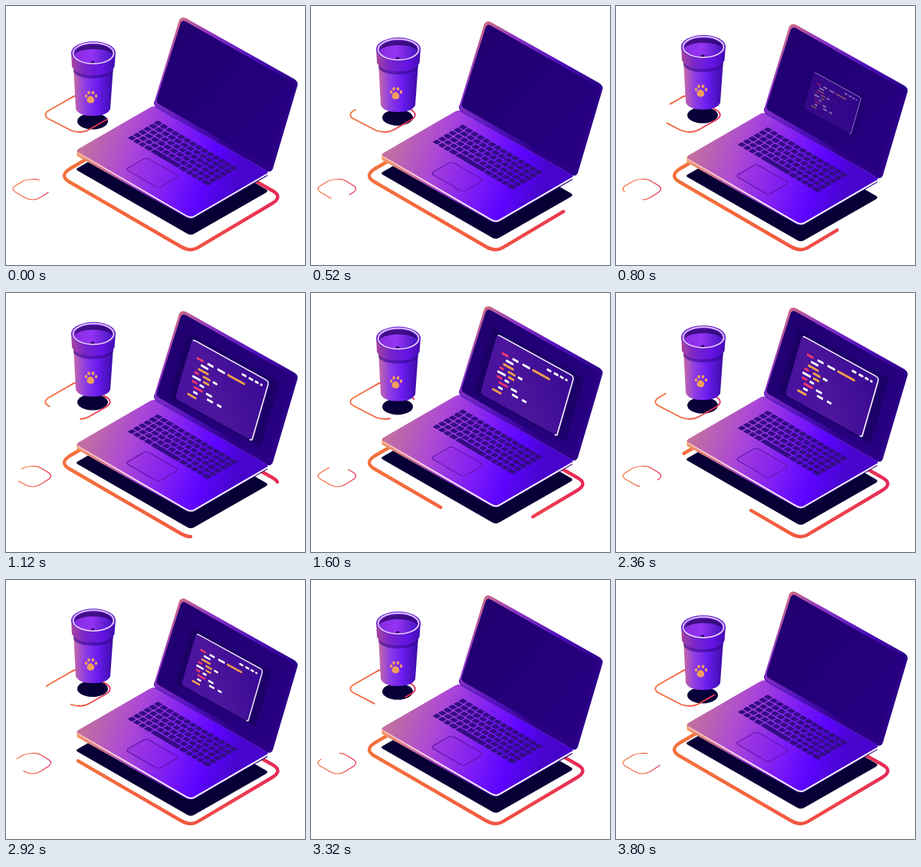
These frames come from a looping animation (390x337 px, 3840 ms). An HTML page:

```html
<!DOCTYPE html>
<html lang="en">
<head>
<meta charset="utf-8">
<title>Laptop and cup</title>
<style>
  html, body { margin: 0; width: 100%; height: 100%; overflow: hidden; background: #fff; }
  svg { display: block; }
  .loop { fill: none; stroke-linecap: round; }
</style>
</head>
<body>
<svg width="390" height="337" viewBox="0 0 390 337">
  <defs>
    <linearGradient id="trail">
      <stop offset=".1" stop-color="#f3703c"/><stop offset=".55" stop-color="#f2593f"/><stop offset="1" stop-color="#e62a58"/>
    </linearGradient>
    <linearGradient id="deck" gradientUnits="userSpaceOnUse" x1="105" y1="165" x2="300" y2="235">
      <stop offset="0" stop-color="#c2719f"/><stop offset=".3" stop-color="#ac48d6"/>
      <stop offset=".6" stop-color="#7c1cf6"/><stop offset=".8" stop-color="#5c04ff"/><stop offset="1" stop-color="#4804cc"/>
    </linearGradient>
    <linearGradient id="side">
      <stop offset="0" stop-color="#f59a5e"/><stop offset=".3" stop-color="#a23bd0"/><stop offset=".6" stop-color="#2a0080"/>
    </linearGradient>
    <linearGradient id="rimlight">
      <stop offset="0" stop-color="#f6b7b0"/><stop offset=".4" stop-color="#f8e6ff"/><stop offset="1" stop-color="#fff"/>
    </linearGradient>
    <linearGradient id="lid" gradientUnits="userSpaceOnUse" x1="215" y1="20" x2="350" y2="150">
      <stop offset="0" stop-color="#d5707e"/><stop offset=".25" stop-color="#8f35c4"/>
      <stop offset=".6" stop-color="#5010bc"/><stop offset=".9" stop-color="#2c0088"/>
    </linearGradient>
    <linearGradient id="screen" x1="0" y1="0" x2="1" y2="1">
      <stop offset="0" stop-color="#20006e"/><stop offset="1" stop-color="#280084"/>
    </linearGradient>
    <linearGradient id="pane" x1="0" y1=".8" x2="1" y2=".2">
      <stop offset="0" stop-color="#4a12a0"/><stop offset=".4" stop-color="#4c159c"/><stop offset="1" stop-color="#3a0a94"/>
    </linearGradient>
    <linearGradient id="body">
      <stop offset="0" stop-color="#c66ca4"/><stop offset=".28" stop-color="#8f3ce4"/>
      <stop offset=".6" stop-color="#6a1cf0"/><stop offset="1" stop-color="#3c0ca6"/>
    </linearGradient>
    <linearGradient id="band">
      <stop offset="0" stop-color="#a8489c"/><stop offset=".3" stop-color="#7a25cc"/>
      <stop offset=".7" stop-color="#6414e4"/><stop offset="1" stop-color="#420cae"/>
    </linearGradient>
    <linearGradient id="well">
      <stop offset="0" stop-color="#8a2ce0"/><stop offset=".45" stop-color="#9434f4"/><stop offset="1" stop-color="#4814c4"/>
    </linearGradient>
  </defs>

  <path class="loop" id="bigLoop" pathLength="100" stroke="url(#trail)" stroke-width="4.4" stroke-dasharray="79 21"
    d="M241 317Q235 317 228 313L83 229Q69 221 83 212L176 158Q189 150 202 158L347 240Q362 248 347 257L254 312Q247 317 241 317"/>
  <path class="loop" id="smallLoop" pathLength="100" stroke="url(#trail)" stroke-width="1.2" stroke-dasharray="78 22"
    d="M34 225.500Q42 225 46 228L56 234Q61 238 56 242L45 249Q40 252 35 252Q29 252 24 249L12 242Q6 238 12 234L22 228Q27 225.500 34 225.500"/>

  <ellipse id="cupShadow" cx="113" cy="150" rx="20" ry="10.5" fill="#080038"/>
  <path class="loop" id="cupLoop" pathLength="100" stroke="url(#trail)" stroke-width="1.8" stroke-dasharray="78 22"
    d="M97 164Q103 164 108 161L131 148Q140 142 132 136L103 119Q92 114 84 120L55 136.500Q48 141 54 146L85 162Q91 164 97 164"/>

  <g id="cup">
    <path d="M88 78L91 134Q95 143 113 143Q132 143 136 134L140 78Z" fill="url(#body)"/>
    <path d="M88 80Q93 90 114 90Q135 90 140 80L139.500 85Q133 94 114 94Q94 94 88.300 86Z" fill="#34058c" opacity=".6"/>
    <path d="M85 60L86 79Q92 90 114 90Q136 90 141.500 79L143 60Z" fill="url(#band)"/>
    <ellipse cx="114" cy="61" rx="29" ry="15" fill="#6c26d4"/>
    <ellipse cx="114" cy="62" rx="25" ry="12.500" fill="url(#well)"/>
    <path d="M89 63Q92 50 114 50Q136 50 139 63Q132 56 114 56Q96 56 89 63" fill="#2c066c" opacity=".8"/>
    <ellipse cx="113" cy="73" rx="2.500" ry="1.600" fill="#2a0468"/>
    <ellipse cx="114" cy="61.500" rx="26.500" ry="13.500" fill="none" stroke="#efdcff" stroke-width="1.500"/>
    <g fill="#ee9f5c">
      <path d="M110 117Q113 117 115 121Q116 126 110.500 126.500Q105 126 105.500 121.500Q107 117 110 117"/>
      <ellipse cx="104.500" cy="117" rx="1.700" ry="2.200"/>
      <ellipse cx="108" cy="112.800" rx="1.800" ry="2.300"/>
      <ellipse cx="113.500" cy="112.800" rx="1.800" ry="2.300"/>
      <ellipse cx="117.500" cy="117" rx="1.700" ry="2.200"/>
    </g>
  </g>

  <g id="laptop">
    <path d="M93 211L192 154L340 239Q342 241 339 243L246 296Q241 299 236 296L93 214Q91 212.500 93 211" fill="#060035"/>
    <path d="M92.500 188V195L235 275.500Q241 278.500 246 275.500L341 221V216Z" fill="url(#side)"/>
    <path d="M96 185L188 132Q193 129 199 132L340 213Q343 216 340 219L246 273Q241 276 235 273L95 191Q90 188 96 185" fill="url(#deck)"/>
    <path d="M94 191L235 273Q241 276.500 246 273.500L341 218.500" fill="none" stroke="url(#rimlight)" stroke-width="2"/>
    <g id="keys" transform="matrix(.875 .52 -.866 .5 198 149)" fill="#340c84"/>
    <rect transform="matrix(.866 .5 -.866 .5 183 197)" width="49" height="31" rx="4" fill="#8a20e8" fill-opacity=".25" stroke="#5c14ac" stroke-width="1.300"/>
    <path d="M226 18Q229 13 235 16L376 95Q382 99 380 104L348 212Q345 218 339 214L198 133Q192 129 194 123Z" fill="url(#lid)"/>
    <path d="M194 124Q192 129 198 133L339 214" fill="none" stroke="#5418c0" stroke-width="1.200"/>
    <path d="M228 22Q230 18 234 20L370 97Q376 100 375 105L344 203Q342 209 337 206L200 128Q195 125 197 120Z" fill="url(#screen)"/>
    <g id="editor">
      <g transform="matrix(1 .55 -.29 1 243 51.500)">
        <rect x="-8" y="-5" width="120" height="84" rx="3" fill="#190060" opacity=".7"/>
        <rect width="100" height="77" rx="4" fill="url(#pane)"/>
        <path d="M1 1Q2 0 5 0H96Q100 0 100 4V75Q100 77 97 77" fill="none" stroke="#f4eaff" stroke-width="1.500"/>
        <g id="code"/>
      </g>
    </g>
  </g>
</svg>
<script>
const PERIOD = 3840;
const $ = id => document.getElementById(id);

function addRect(parent, x, y, width, height, rx, fill) {
  const rect = document.createElementNS('http://www.w3.org/2000/svg', 'rect');
  const attrs = { x, y, width, height, rx };
  if (fill) attrs.fill = fill;
  for (const name in attrs) rect.setAttribute(name, attrs[name]);
  parent.append(rect);
}

// Keyboard: five rows of equal keys, then a row with the space bar.
for (let row = 0; row < 5; row++) {
  const count = row % 2 ? 13 : 14, pitch = 121 / count;
  for (let i = 0; i < count; i++) addRect($('keys'), i * pitch, row * 7.8, pitch - 1.5, 6.3, 1.2);
}
let keyX = 0;
for (const w of [8, 8, 8, 10, 42, 10, 8, 8, 8, 11]) {
  addRect($('keys'), keyX, 39, w - 1.5, 6.5, 1.2);
  keyX += w;
}

// Code rows: colour letter, start, length.
const inks = { w: '#fff', o: '#f0a04c', p: '#f0386e' };
const rows = [
  'p11,9 w25,8 w38,10 o51,23', 'w18,10', 'o16,14', 'p13,6 o24,10 w37,6', 'w12,11 o26,8',
  'p13,7 w23,6', 'p17,12 w33,8', 'w18,6 w36,8 w49,6', 'o12,12'
];
const drawRow = (row, y) => row.split(' ').forEach(part => {
  const [x, w] = part.slice(1).split(',');
  addRect($('code'), x, y, w, 2.8, 1, inks[part[0]]);
});
rows.forEach((row, i) => drawRow(row, 16.7 + i * 5.75));
drawRow('w67,6 w76,6 w84,5 w91,3', 7);

const clamp = v => Math.min(1, Math.max(0, v));
const smooth = v => v * v * (3 - 2 * v);
const shift = (id, y) => $(id).setAttribute('transform', `translate(0 ${y})`);
const setGapEnd = (id, percent) => $(id).setAttribute('stroke-dashoffset', -(percent + 200) % 100);

function draw(t) {
  const bob = (1 - Math.cos(4 * Math.PI * t / PERIOD)) / 2;
  shift('laptop', 9.2 * bob);
  shift('cup', -8.8 * bob);
  shift('cupShadow', -8.5 * bob);

  const turn = (t - 1120) / PERIOD * 100;
  setGapEnd('bigLoop', turn);
  setGapEnd('cupLoop', turn * 2);
  setGapEnd('smallLoop', turn * 2 - 12);

  const open = smooth(clamp(Math.min(t - 640, 3200 - t) / 400));
  $('editor').setAttribute('opacity', clamp(open * 1.3));
  $('editor').setAttribute('transform', `translate(283 118) scale(${0.4 + 0.6 * open}) translate(-283 -118)`);
}

function tick() {
  draw(performance.now() % PERIOD);
  requestAnimationFrame(tick);
}
tick();
</script>
</body>
</html>
```
